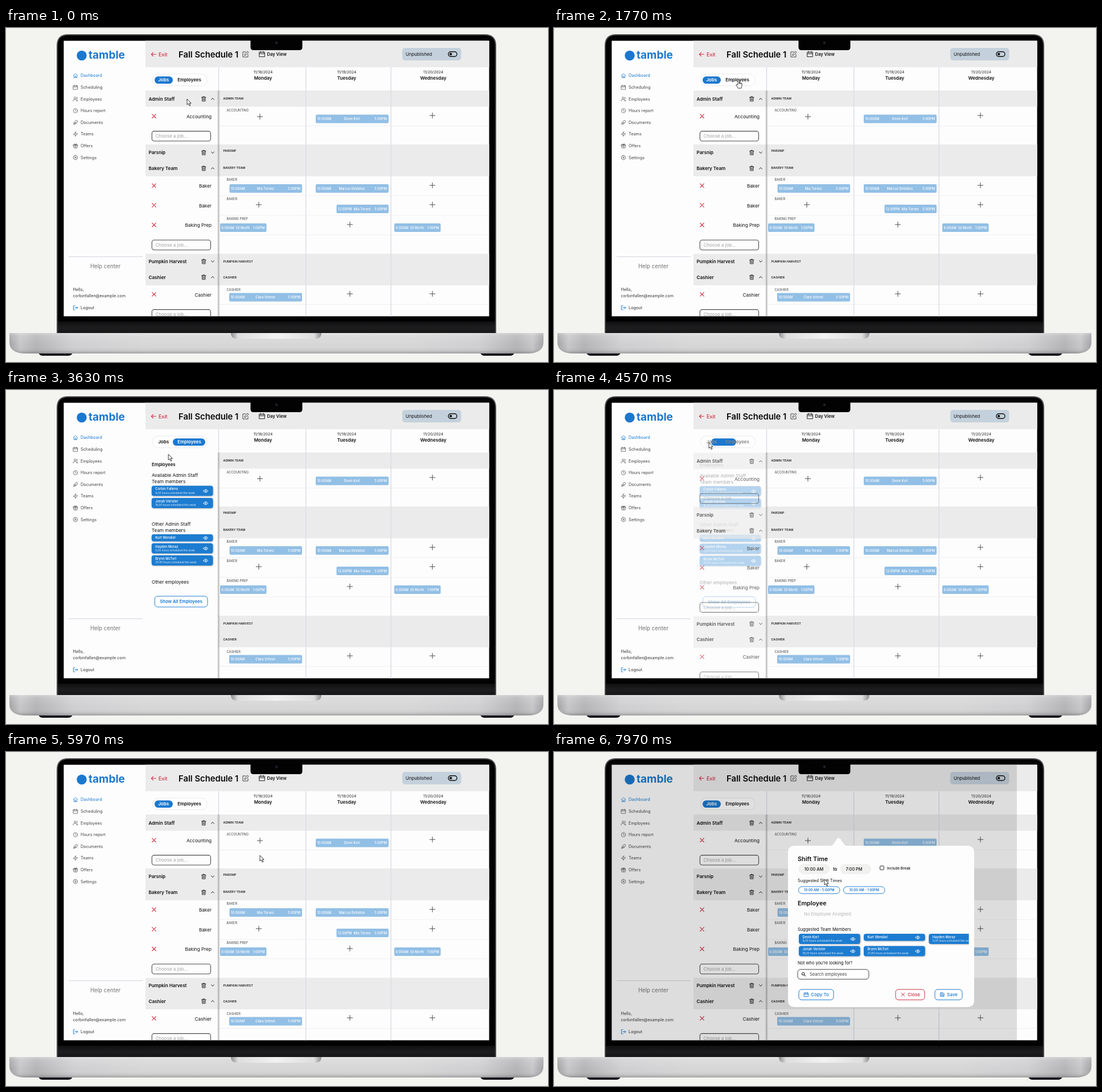
Recreate the animation shown at these times as an HTML page. Size 952 by 588 pixels, loop 8 s.

```html
<!DOCTYPE html>
<html lang="en">
<head>
<meta charset="utf-8">
<title>Schedule builder</title>
<style>
html, body { margin: 0; width: 100%; height: 100%; overflow: hidden; background: #f3f3f0; }
svg { display: block; width: 952px; height: 588px; font-family: Inter, "Open Sans", sans-serif; }
</style>
</head>
<body>
<script>
const BLUE = '#1b78cf', RED = '#d02c40', INK = '#111', BAND = '#ebebeb', WHITE = '#fdfdfd';

// Drawing helpers: y of a text is the middle of its capitals.
const text = (s, x, y, size, fill = INK, weight = 400, anchor = 'start', id = '') =>
  `<text ${id && `id="${id}"`} x="${x}" y="${y + size * 0.36}" font-size="${size}" fill="${fill}" font-weight="${weight}" text-anchor="${anchor}">${s}</text>`;
const mid = (s, x, y, size, fill, weight) => text(s, x, y, size, fill, weight, 'middle');
const end = (s, x, y, size, fill, weight) => text(s, x, y, size, fill, weight, 'end');
const box = (x1, y1, x2, y2, fill, r = 0, stroke = 'none', w = 1, extra = '') =>
  `<rect x="${x1}" y="${y1}" width="${x2 - x1}" height="${y2 - y1}" rx="${r}" fill="${fill}" stroke="${stroke}" stroke-width="${w}" ${extra}/>`;
const line = (x1, y1, x2, y2, stroke, w = 1) =>
  `<path d="M${x1} ${y1}L${x2} ${y2}" stroke="${stroke}" stroke-width="${w}"/>`;
const circle = (x, y, r, fill) => `<circle cx="${x}" cy="${y}" r="${r}" fill="${fill}"/>`;
const icon = (name, x, y, color = '#444', scale = 1, w = 0.8) =>
  `<path transform="translate(${x} ${y}) scale(${scale})" d="${ICONS[name]}" fill="none" stroke="${color}" stroke-width="${w / scale}" stroke-linecap="round" stroke-linejoin="round"/>`;

const ICONS = {
  home: 'M-4 -.5L0 -4L4 -.5M-3 -1V4H3V-1M-1 4V1H1V4',
  calendar: 'M-4 -3H4V4H-4ZM-4 -.6H4M-2 -4.3V-2M2 -4.3V-2',
  people: 'M-1 -3.7a1.7 1.7 0 1 0 .1 0M-4.3 4V2.5Q-4 .8 -2 .8H0Q2 .8 2.2 2.5V4M2 -3.6a1.6 1.6 0 0 1 0 3.2M3 1Q4.3 1.4 4.3 4',
  clock: 'M4 0a4 4 0 1 1 -8 0a4 4 0 1 1 8 0M0 -2.4V0L1.6 .9',
  feather: 'M-4 4L1 -1M-3 3V0L1 -3.6Q4 -4.5 4 -1L0 3ZM-1 1.4H2',
  bolt: 'M.6 -4.3L-4 1H0L-.6 4.3L4 -1H0Z',
  gift: 'M-4 -2H4V0H-4ZM-3.3 0V4H3.3V0M0 -2V4M0 -2Q-3 -2 -2.4 -3.7Q-1 -4.5 0 -2Q1 -4.5 2.4 -3.7Q3 -2 0 -2',
  gear: 'M-1 -4.2H1L1.6 -3L3.2 -2.8L4.2 -1L3.5 0L4.2 1L3.2 2.8L1.6 3L1 4.2H-1L-1.6 3L-3.2 2.8L-4.2 1L-3.5 0L-4.2 -1L-3.2 -2.8L-1.6 -3ZM1.4 0a1.4 1.4 0 1 0 -2.8 0a1.4 1.4 0 1 0 2.8 0',
  logout: 'M-1 -4H-4V4H-1M-1.5 0H4.3M2 -2.3L4.3 0L2 2.3',
  back: 'M4 0H-4M-.8 -3.2L-4 0L-.8 3.2',
  edit: 'M0 -4H-5V5H4V.5M-1.8 2L-1.3 -.4L3.3 -5L5 -3.2L.5 1.4Z',
  trash: 'M-3.7 -2.7H3.7M-1.4 -2.7V-4H1.4V-2.7M-2.9 -2.7L-2.6 4H2.6L2.9 -2.7M-.9 -.8V2.3M.9 -.8V2.3',
  up: 'M-2.5 1.2L0 -1.2L2.5 1.2',
  down: 'M-2.5 -1.2L0 1.2L2.5 -1.2',
  cross: 'M-3.3 -3.3L3.3 3.3M3.3 -3.3L-3.3 3.3',
  plus: 'M-4.7 0H4.7M0 -4.7V4.7',
  eye: 'M-4 0Q0 -5.4 4 0Q0 5.4 -4 0ZM1.2 0a1.2 1.2 0 1 0 -2.4 0a1.2 1.2 0 1 0 2.4 0',
  search: 'M1.4 -.8a2.2 2.2 0 1 0 -4.4 0a2.2 2.2 0 1 0 4.4 0M.8 .8L3 3',
  save: 'M-3.5 -3.5H2L3.5 -2V3.5H-3.5ZM-1.8 -3.3V-1.2H1.4M-1.8 3.4V.6H1.8V3.4',
};

const laptop = () => {
  const base = 'M6 537H944V553Q944 573 915 573H35Q6 573 6 553Z';
  const foot = x => `<path d="M${x} 572H${x + 60}Q${x + 58} 577 ${x + 52} 577H${x + 8}Q${x + 2} 577 ${x} 572Z" fill="#15161d"/>`;
  return `${foot(57)}${foot(833)}
  <path d="M89 538V31Q89 11 109 11H841Q861 11 861 31V538Z" fill="#4b4b4d"/>
  <path d="M91 538V31Q91 13 109 13H841Q859 13 859 31V538Z" fill="#020202"/>
  ${box(91, 517, 859, 538, 'url(#chin)')}
  <path d="${base}" fill="url(#metal)"/><path d="${base}" fill="url(#shade)"/>
  <path d="M395 537H554Q554 547 543 547H406Q395 547 395 537Z" fill="url(#lip)"/>`;
};

const sidebar = () => {
  const items = [['home', 'Dashboard'], ['calendar', 'Scheduling'], ['people', 'Employees'], ['clock', 'Hours report'],
    ['feather', 'Documents'], ['bolt', 'Teams'], ['gift', 'Offers'], ['gear', 'Settings']];
  return circle(133, 48.5, 8.7, BLUE) + text('tamble', 145, 47.5, 19, BLUE, 700) +
    items.map(([name, label], i) => {
      const y = 83.8 + i * 20.6, color = i ? '#444' : BLUE;
      return icon(name, 122, y, color, 0.92, 0.7) + text(label, 131, y, 7.3, color);
    }).join('') +
    line(110, 402.7, 240, 402.7, '#d2d2dc') + mid('Help center', 174.5, 420, 9.7, '#747474') +
    text('Hello,', 117.5, 460.5, 7.2, '#333') + text('corbinfallen@example.com', 117.5, 471.8, 7.2, '#333') +
    icon('logout', 122, 492.5, BLUE, 0.9, 0.9) + text('Logout', 131, 492.5, 7.3, '#333');
};

const header = () => box(245, 22, 849, 69, BAND) +
  icon('back', 259.3, 46.3, RED, 1, 1.1) + text('Exit', 268, 46.5, 8.9, RED, 500) +
  text('Fall Schedule 1', 303, 46.5, 14.8, '#090909', 600) + icon('edit', 421, 46, '#333', 1, 0.9) +
  icon('calendar', 449.7, 46, '#222', 1.15, 1) + text('Day View', 458.5, 46.5, 7.6, INK, 600) +
  box(696, 35, 799.5, 57, '#c4d1dc', 5) + text('Unpublished', 702, 46.2, 7.8) +
  box(777, 41.8, 792, 50.2, 'none', 4.2, INK, 1.4) + circle(781.2, 46, 2.2, INK);

const shift = (x1, x2, y, from, name, to) => box(x1, y, x2, y + 15, '#92bfe5', 2) +
  text(from, x1 + 2.5, y + 7.7, 5.8, '#fff', 500) + mid(name, (x1 + x2) / 2 - 0.5, y + 7.7, 5.7, '#fff', 500) +
  end(to, x2 - 3, y + 7.7, 5.8, '#fff', 500);

const bands = (x1, x2) => [[110, 138.5], [205, 261], [397.5, 453]].map(([a, b]) => box(x1, a, x2, b, BAND)).join('');

const grid = () => {
  const days = [[451.5, '11/18/2024', 'Monday'], [598.5, '11/19/2024', 'Tuesday'], [750.5, '11/20/2024', 'Wednesday']];
  const teams = [[124, 'ADMIN TEAM'], [216.5, 'PARSNIP'], [246.5, 'BAKERY TEAM'], [411.5, 'PUMPKIN HARVEST'], [439, 'CASHIER']];
  const jobs = [[145, 'ACCOUNTING'], [267, 'BAKER'], [300.5, 'BAKER'], [336, 'BAKING PREP'], [461, 'CASHIER']];
  const open = [[446, 156], [749, 154], [749, 277], [444, 311], [749, 311], [604, 346], [604, 468], [749, 468]];
  return bands(373, 849) +
    [172.5, 295, 330, 364, 486.5].map(y => line(374, y, 849, y, '#ececf1', 0.8)).join('') +
    [526.7, 676.2].map(x => line(x, 69, x, 508, '#dbdbea', 1.4)).join('') +
    line(373.5, 69, 373.5, 110, '#d8d8e4', 1.2) +
    days.map(([x, date, day]) => mid(date, x, 78, 6.7, '#222') + mid(day, x, 88.5, 8.1, INK, 600)).join('') +
    teams.map(([y, s]) => text(s, 381.5, y, 5.4, '#222', 600)).join('') +
    jobs.map(([y, s]) => text(s, 387.5, y, 5.7, '#444')).join('') +
    open.map(([x, y]) => icon('plus', x, y, '#444', 1, 0.95)).join('') +
    shift(544, 672, 152.5, '10:00AM', 'Devin Korl', '5:00PM') +
    shift(392.5, 520, 275, '10:00AM', 'Mia Torvez', '5:00PM') +
    shift(544, 672, 275, '10:00AM', 'Marcus DeVallon', '5:00PM') +
    shift(580.5, 672, 311, '12:00PM', 'Mia Torvez', '5:00PM') +
    shift(376, 457.5, 344, '6:00AM', 'Eli Morth', '1:00PM') +
    shift(682, 763.5, 344, '6:00AM', 'Eli Morth', '1:00PM') +
    shift(392, 520, 466.5, '10:00AM', 'Clara Vohnel', '5:00PM');
};

const jobsPanel = () => {
  const team = (s, y, chevron) => text(s, 250.5, y, 8.1, INK, 600) +
    icon('trash', 347.3, y, '#222', 1, 0.95) + icon(chevron, 363, y, '#222', 1, 1);
  const job = (s, y) => icon('cross', 260, y - 0.8, RED, 1, 1.1) + end(s, 361, y, 8.2);
  const choose = y => box(256.3, y - 8.7, 359.5, y + 8.7, 'none', 4, '#4a4a4a', 1.1) + text('Choose a job...', 262.5, y, 8, '#a2a2a2');
  return bands(245, 373) +
    team('Admin Staff', 124.8, 'up') + job('Accounting', 156) + choose(190.3) +
    team('Parsnip', 219.3, 'down') + team('Bakery Team', 247, 'up') +
    job('Baker', 278.3) + job('Baker', 312.8) + job('Baking Prep', 347.5) + choose(382) +
    team('Pumpkin Harvest', 411, 'down') + team('Cashier', 438.7, 'up') + job('Cashier', 469.7) + choose(504.3);
};

const card = (x, y, name, hours) => {
  const h = hours ? 18 : 12.5;
  return box(x, y, x + 107.8, y + h, '#1f7bd0', 4, 'none', 0, 'filter="url(#soft)"') +
    text(name, x + 6.5, y + (hours ? 5.8 : 6.3), 5.8, '#fff', 500) +
    (hours ? text(hours + ' hours scheduled this week', x + 6.5, y + 12.6, 4.6, '#e4effa') : '') +
    icon('eye', x + 95, y + h / 2 + 0.3, '#fff', 1, 0.9);
};

const button = (x1, x2, y1, y2, label, size, color, r = 5) =>
  box(x1, y1, x2, y2, '#fff', r, color, 0.95) + mid(label, (x1 + x2) / 2, (y1 + y2) / 2, size, color, 600);

const employeesPanel = () => text('Employees', 256, 131.2, 7.9, INK, 600) +
  text('Available Admin Staff', 256, 150.5, 8.1) + text('Team members', 256, 161.2, 8.1) +
  card(255.7, 168.5, 'Corbin Falleno', '8/30') + card(255.7, 190, 'Jonah Verister', '18/30') +
  text('Other Admin Staff', 256, 236, 8.1) + text('Team members', 256, 246.6, 8.1) +
  card(255.7, 254, 'Kurt Wendiel') + card(255.7, 269.7, 'Hayden Moraz', '0/30') + card(255.7, 291, 'Brynn McTorl', '37/40') +
  text('Other employees', 256, 338.5, 8.1) + button(261.3, 354, 363, 382, 'Show All Employees', 7.7, BLUE);

const modal = () => {
  const action = (x1, x2, name, label, color) => box(x1, 418, x2, 436.3, '#fff', 5, color, 1) +
    icon(name, x1 + 13, 427, color, 0.9, 0.9) + text(label, x1 + 21.3, 427, 8, color, 500);
  return `<path d="M423 165H486Q489 165 491 162L497 153Q500 149.500 503 153L509 162Q511 165 514 165H726Q738 165 738 177V437Q738 449 726 449H423Q411 449 411 437V177Q411 165 423 165Z" fill="${WHITE}"/>` +
    text('Shift Time', 428, 188.3, 10.9, INK, 600) +
    box(429.5, 197, 484.5, 215, '#f1f1f0', 9) + mid('10:00 AM', 456.5, 206, 7.4, INK, 500) +
    mid('to', 493.8, 206, 7.4, INK, 600) + box(502.5, 197, 557, 215, '#f1f1f0', 9) + mid('7:00 PM', 527, 206, 7.4, INK, 500) +
    box(572.7, 200.7, 579.3, 207.3, '#fff', 1, '#222', 1) + text('Include Break', 585, 204.3, 6.3, INK, 500) +
    text('Suggested Shift Times', 428, 226.7, 7.3) +
    button(429.5, 502, 237, 249.3, '10:00 AM - 5:00PM', 5.7, BLUE, 6) + button(508.5, 581, 237, 249.3, '10:00 AM - 1:00PM', 5.7, BLUE, 6) +
    text('Employee', 428, 266, 10.7, INK, 600) + text('No Employee Assigned', 439, 285.3, 7.6, '#b4b4b4') +
    text('Suggested Team Members', 428, 312, 7.4) +
    `<g clip-path="url(#cards)">` + card(430, 320, 'Devin Korl', '8/30') + card(544, 320, 'Kurt Wendiel') + card(658.3, 320, 'Hayden Moraz', '0/30') +
    card(430, 341.5, 'Jonah Verister', '18/30') + card(544, 341.5, 'Brynn McTorl', '37/40') + `</g>` +
    text('Not who you’re looking for?', 428, 371, 7.4) +
    box(428, 382.8, 553, 400, '#fff', 5, '#444', 1) + icon('search', 438.5, 391.3, '#222', 1, 1.1) + text('Search employees', 449, 391.5, 7.5, '#444') +
    action(430, 491, 'calendar', 'Copy To', BLUE) + action(600, 651, 'cross', 'Close', RED) + action(669, 717, 'save', 'Save', BLUE);
};

const stops = list => list.map(([at, color, a = 1]) => `<stop offset="${at}" stop-color="${color}" stop-opacity="${a}"/>`).join('');
const gradient = (id, list, down) => `<linearGradient id="${id}" ${down ? 'x2="0" y2="1"' : ''}>${stops(list)}</linearGradient>`;

document.body.innerHTML = `<svg viewBox="0 0 952 588"><defs>
  ${gradient('metal', [[0, '#a2a2a5'], [0.02, '#c6c6c8'], [0.05, '#b4b4b7'], [0.12, '#cfcfd1'], [0.25, '#d6d6d7'], [0.75, '#d6d6d7'], [0.88, '#cfcfd1'], [0.95, '#b4b4b7'], [0.98, '#c6c6c8'], [1, '#a2a2a5']])}
  ${gradient('shade', [[0, '#fff', 0.35], [0.15, '#fff', 0.15], [0.6, '#fff', 0], [0.85, '#555', 0.08], [1, '#444', 0.35]], true)}
  ${gradient('lip', [[0, '#8e8e90'], [0.08, '#dededf'], [0.5, '#f1f1f1'], [0.92, '#dededf'], [1, '#8e8e90']])}
  ${gradient('chin', [[0, '#101011'], [0.5, '#1d1d1f'], [1, '#161617']], true)}
  ${gradient('edge', [[0, '#666', 0], [0.45, '#666', 0.45], [1, '#888', 0]])}
  <filter id="soft" x="-10%" y="-20%" width="120%" height="150%"><feDropShadow dx="0.7" dy="1" stdDeviation="0.9" flood-opacity="0.28"/></filter>
  <clipPath id="screen"><path d="M101.400 22.400H848.600V507.600H101.400Z"/></clipPath>
  <clipPath id="cards"><path d="M424 315H728.700V364H424Z"/></clipPath>
  </defs>${box(0, 0, 952, 588, '#f3f3f0')}${laptop()}
  <g clip-path="url(#screen)">${box(101, 22, 849, 508, WHITE)}${sidebar()}${header()}${grid()}
    <g id="staff">${employeesPanel()}</g><g id="jobs">${jobsPanel()}</g>
    ${box(371, 110, 376, 508, 'url(#edge)')}
    ${box(257.5, 81, 353.3, 101.7, '#fff', 10, '#e9e9ec', 1)}${box(261, 85.2, 293, 98, BLUE, 6.4, 'none', 0, 'id="pill"')}
    ${text('Jobs', 276.7, 91.5, 8.1, INK, 600, 'middle', 'jobsTab')}${text('Employees', 322, 91.5, 7.9, INK, 600, 'middle', 'staffTab')}
    <g id="popup">${box(101, 22, 813, 508, '#000', 0, 'none', 0, 'opacity=".125"')}${modal()}</g>
  </g>
  <path d="M429.500 22V34Q429.500 39 434.500 39H515.500Q520.500 39 520.500 34V22Z" fill="#020202"/>
  ${circle(475, 26, 2.6, '#16171c')}${circle(475, 26, 1.1, '#262b3a')}
  <g id="cursor" stroke="#222" stroke-width=".9" stroke-linejoin="round" fill="#fff">
    <path id="arrow" d="M0 0V10L2.400 7.900L4.200 12L5.900 11.200L4.200 7.300H7.200Z"/>
    <path id="hand" d="M-1.200 7V1Q-1.200 0 0 0Q1.100 0 1.100 1V5Q2.200 4.300 2.900 5.300Q4 4.700 4.600 5.800Q6 5.400 6 6.900V10Q6 12 4.800 14.500H-.8Q-1.500 12.500 -3.800 9.300Q-4.300 7.800 -3 7.600Q-2.200 7.700 -1.200 9ZM1.100 5V7M2.900 5.300V7.300M4.600 5.800V7.400"/>
  </g></svg>`;

const LOOP = 8000;
const PATH = [[0, 318, 125], [700, 318, 125], [1500, 324, 91.5], [1800, 324, 91.5], [2100, 323, 92], [2900, 323, 92],
  [3500, 285.5, 113.5], [3700, 285, 113], [4250, 272, 92.5], [4900, 272, 92.5], [5800, 446, 182], [6150, 446, 182],
  [6600, 446, 156], [7150, 446, 156], [7800, 475, 224], [8000, 475, 224]];
const HAND = [[1350, 1950], [4150, 4440], [6450, 7010]];

const el = id => document.getElementById(id);
const ramp = (t, from, to) => { const p = Math.min(1, Math.max(0, (t - from) / (to - from))); return p * p * (3 - 2 * p); };
const show = (id, opacity) => { el(id).setAttribute('opacity', opacity); };
const gray = v => `rgb(${v},${v},${v})`;

function draw(t) {
  const staff = ramp(t, 1890, 2200) - ramp(t, 4415, 4715);
  const fade = staff ** 1.5;
  const nudge = staff > 0 && staff < 1 ? 0.7 : 0;
  show('jobs', 1 - fade);
  show('staff', fade);
  for (const id of ['jobs', 'staff']) el(id).setAttribute('transform', `translate(0 ${nudge})`);
  el('pill').setAttribute('x', 261 + 32 * staff);
  el('pill').setAttribute('width', 32 + 25 * staff);
  el('jobsTab').setAttribute('fill', gray(255 - 238 * staff));
  el('staffTab').setAttribute('fill', gray(17 + 238 * staff));
  show('popup', ramp(t, 7000, 7200));

  const i = PATH.findIndex(([at]) => at > t), [t0, x0, y0] = PATH[i - 1], [t1, x1, y1] = PATH[i];
  const p = ramp(t, t0, t1);
  el('cursor').setAttribute('transform', `translate(${x0 + (x1 - x0) * p} ${y0 + (y1 - y0) * p})`);
  const pointing = HAND.some(([a, b]) => t >= a && t < b);
  show('hand', +pointing);
  show('arrow', +!pointing);
}

const start = performance.now();
function tick() {
  draw((performance.now() - start) % LOOP);
  requestAnimationFrame(tick);
}
tick();
</script>
</body>
</html>
```
